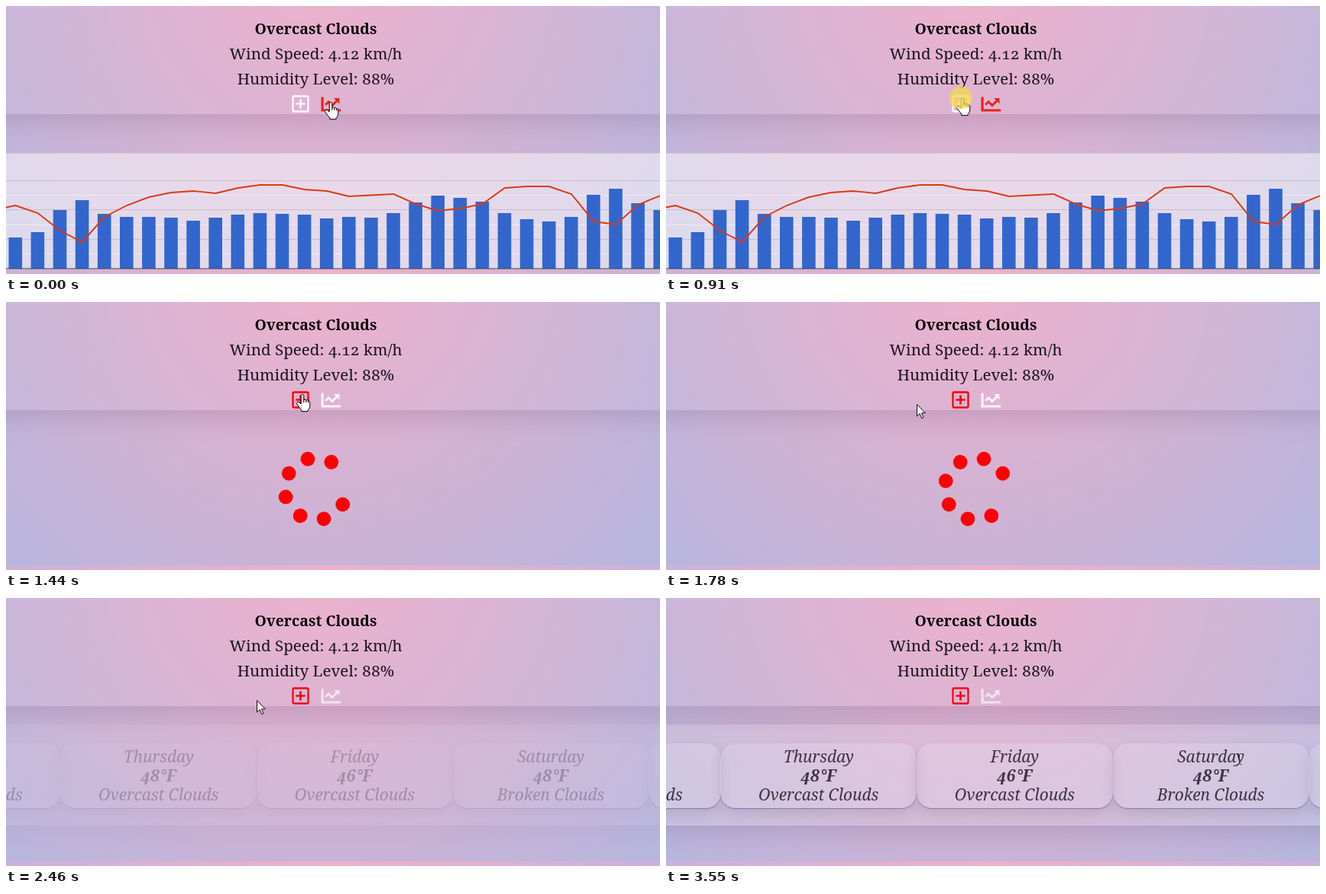
Animation, 856 px wide and 352 px high, one loop 3610 ms. Source, as an HTML page:

```html
<!DOCTYPE html>
<html lang="en">
<head>
<meta charset="utf-8">
<title>Weather forecast</title>
<style>
html, body { margin: 0; width: 100%; height: 100%; overflow: hidden; }
#stage {
  position: relative; width: 856px; height: 352px; overflow: hidden;
  background: radial-gradient(circle 945px at 408px -44px, #eeaeca, #94bbe9);
}
#stage > *, .card { position: absolute; }
#head {
  left: -60px; top: -60px; width: 976px; height: 202px;
  background: rgba(255, 255, 255, .04);
  box-shadow: 0 8px 32px rgba(60, 40, 80, .17);
}
#carousel {
  left: -60px; top: 166px; width: 976px; height: 133px;
  background: rgba(255, 255, 255, .13);
  box-shadow: 0 8px 32px rgba(60, 40, 80, .17);
}
.card {
  top: 25px; width: 257px; height: 85px; border-radius: 20px;
  background: rgba(255, 255, 255, .13);
  box-shadow: 0 1px 1px rgba(50, 35, 65, .36), 0 8px 16px rgba(60, 40, 80, .13);
  font: italic 300 20.9px/25px "Noto Serif", serif;
  font-variant-numeric: oldstyle-nums;
  color: #3f3343; text-align: center; padding-top: 5px; box-sizing: border-box;
  white-space: nowrap;
}
#foot {
  left: 0; top: 346px; width: 856px; height: 6px;
  background: linear-gradient(90deg, #cbb2d9, #efafca 50%, #cbb2d9);
}
svg { left: 0; top: 0; }
text {
  font: 300 20.6px "Noto Serif", serif;
  font-variant-numeric: oldstyle-nums; text-anchor: middle; fill: #1a141a;
}
text.title { font-weight: 700; font-size: 19.5px; fill: #0b080b; }
</style>
</head>
<body>
<div id="stage">
  <div id="head"></div>
  <svg width="856" height="352">
    <text class="title" x="405.5" y="37">Overcast Clouds</text>
    <text x="405.5" y="70">Wind Speed: 4.12 km/h</text>
    <text x="405.5" y="103">Humidity Level: 88%</text>
    <g id="plus" fill="none" stroke="currentColor">
      <rect x="375.5" y="118.5" width="20" height="20" rx="1.5" stroke-width="2.3"/>
      <path d="M379.5 128.5h12M385.5 122.5v12" stroke-width="2.7"/>
    </g>
    <g id="trend" fill="none" stroke="currentColor">
      <path d="M414.1 119.4V137H438.2" stroke-width="3.2"/>
      <path d="M418.1 129.8l4-4 4.8 4.8 6.4-6.4" stroke-width="2.9"/>
      <path d="M429 121h7.5v7.6z" fill="currentColor" stroke="none"/>
    </g>
    <g id="chart"><rect y="193.5" width="856" height="152.5" fill="#fff" opacity=".5"/></g>
    <g id="spinner" fill="#f00"></g>
  </svg>
  <div id="carousel"></div>
  <div id="foot"></div>
  <svg width="856" height="352">
    <g id="hand" fill="#fff" stroke="#000" stroke-linejoin="round">
      <path d="M-1.8 1.8Q0-1.4 1.8 1.8V7.5Q3.6 6.2 4.8 8 6.6 7 7.5 8.7 9.7 8.3 9.8 10.8V15.5Q9.5 19.5 7 21.3V22.7H-1.2V21Q-3 19-6.8 13.8-8.6 11-6.2 10.2-4.3 10-1.8 13Z"/>
      <path d="M1.8 7.5V11M4.8 8V11M7.5 8.7V11.5" fill="none"/>
    </g>
    <path id="arrow" d="M.5.5V16L4.1 12.6 6.7 18.6 9.1 17.6 6.6 11.8H11.3Z" fill="#f4eef4" stroke="#111"/>
    <path id="beam" d="M-3-7H-1L0-6 1-7H3M0-6V6M-3 7H-1L0 6 1 7H3" fill="none" stroke="#333"/>
    <circle id="click" cx="386" cy="120.5" r="15" fill="#f4d84e" opacity=".75"/>
  </svg>
</div>
<script>
const LOOP = 3610, CLICK = 910, LOADING = 1100, READY = 2460;
const $ = id => document.getElementById(id);

function add(parent, tag, attrs) {
  const el = document.createElementNS('http://www.w3.org/2000/svg', tag);
  for (const name in attrs) el.setAttribute(name, attrs[name]);
  parent.append(el);
  return el;
}
const show = (id, on) => { $(id).style.display = on ? '' : 'none'; };

// Hourly chart
const barTops = [304, 297, 268, 255, 273, 277, 277, 278, 282, 278, 274, 272, 273, 274, 279,
  277, 278, 272, 258, 249, 252, 257, 272, 280, 283, 277, 248, 240, 259, 268];
const lineTops = [262, 272, 295, 310, 277, 262, 251, 245, 243, 246, 239, 235, 235, 241, 243,
  250, 248.5, 247, 260, 269, 266, 260, 239, 237, 237, 247, 283, 287, 261, 249];
const hourX = k => 12.5 + 29.1 * k;
const chart = $('chart');
for (let i = 0; i < 6; i++) {
  add(chart, 'rect', { x: 0, y: Math.round(229 + 19.2 * i), width: 856, height: 1, fill: i % 2 ? '#f1eaf4' : '#c9bdcd' });
}
barTops.forEach((y, k) => add(chart, 'rect', { x: hourX(k) - 9, y, width: 17.6, height: 345 - y, fill: '#3366cc' }));
add(chart, 'rect', { x: 0, y: 344.5, width: 856, height: 1, fill: '#3c3840' });
add(chart, 'polyline', {
  points: '-17,268 ' + lineTops.map((y, k) => `${hourX(k)},${y}`).join(' '),
  fill: 'none', stroke: '#dc3912', 'stroke-width': 1.9
});

// Seven dots of an eight-dot ring
for (let i = 0; i < 7; i++) {
  const a = i * Math.PI / 4;
  add($('spinner'), 'circle', { cx: 40.7 * Math.cos(a), cy: 40.7 * Math.sin(a), r: 9.4 });
}

// Daily cards
[['Wednesday', '47°F', 'Overcast Clouds'], ['Thursday', '48°F', 'Overcast Clouds'],
 ['Friday', '46°F', 'Overcast Clouds'], ['Saturday', '48°F', 'Broken Clouds'], ['', '', '']
].forEach(([day, temp, sky], i) => {
  const card = document.createElement('div');
  card.className = 'card';
  card.style.left = 60 - 185.5 + 256.7 * i + 'px';
  card.innerHTML = `${day}<br><b>${temp}</b><br>${sky}`;
  $('carousel').append(card);
});

const spinTimes = [1100, 1240, 1380, 1440, 1580, 1710, 1780, 1920, 1980, 2120, 2180, 2320];
const fade = [[2460, .3], [2530, .55], [2590, .75], [2660, .9], [2730, 1]];
const pointer = [
  [630, 388, 121, 'hand'], [1580, 384, 124, 'hand'], [1650, 364, 130, 'arrow'],
  [1710, 341, 134, 'arrow'], [1780, 328, 134, 'arrow'],
  [3480, 520, 164, 'arrow'], [3550, 750.5, 211.5, 'beam']
];
const current = (steps, t) => steps.filter(s => s[0] <= t).pop();

function pointerAt(t) {
  if (t >= 630) return current(pointer, t);
  const p = Math.floor(t / 70) / 9, e = p * p * (3 - 2 * p);
  const x = 425 - 37 * e;
  return [t, x, 126 - 5 * e, x > 398 && x < 412 ? 'arrow' : 'hand'];
}

function draw(t) {
  const loading = t >= LOADING && t < READY;
  show('chart', t < LOADING);
  show('spinner', loading);
  show('carousel', t >= READY);
  show('click', t >= CLICK && t < LOADING);
  $('plus').style.color = t < LOADING ? 'rgba(255,255,255,.92)' : t < READY ? '#f00' : '#ee0a18';
  $('trend').style.color = t < LOADING ? '#e6241a' : `rgba(255,255,255,${t < READY ? .82 : .62})`;
  if (loading) {
    const angle = 10 * (spinTimes.filter(s => s <= t).length - 1);
    $('spinner').setAttribute('transform', `translate(405.5 245.5) rotate(${angle})`);
  }
  if (t >= READY) $('carousel').style.opacity = current(fade, t)[1];
  const [, x, y, kind] = pointerAt(t);
  for (const id of ['hand', 'arrow', 'beam']) show(id, id === kind);
  $(kind).setAttribute('transform', `translate(${x} ${y})`);
}

const start = performance.now();
function tick() {
  draw((performance.now() - start) % LOOP);
  requestAnimationFrame(tick);
}
tick();
</script>
</body>
</html>
```
